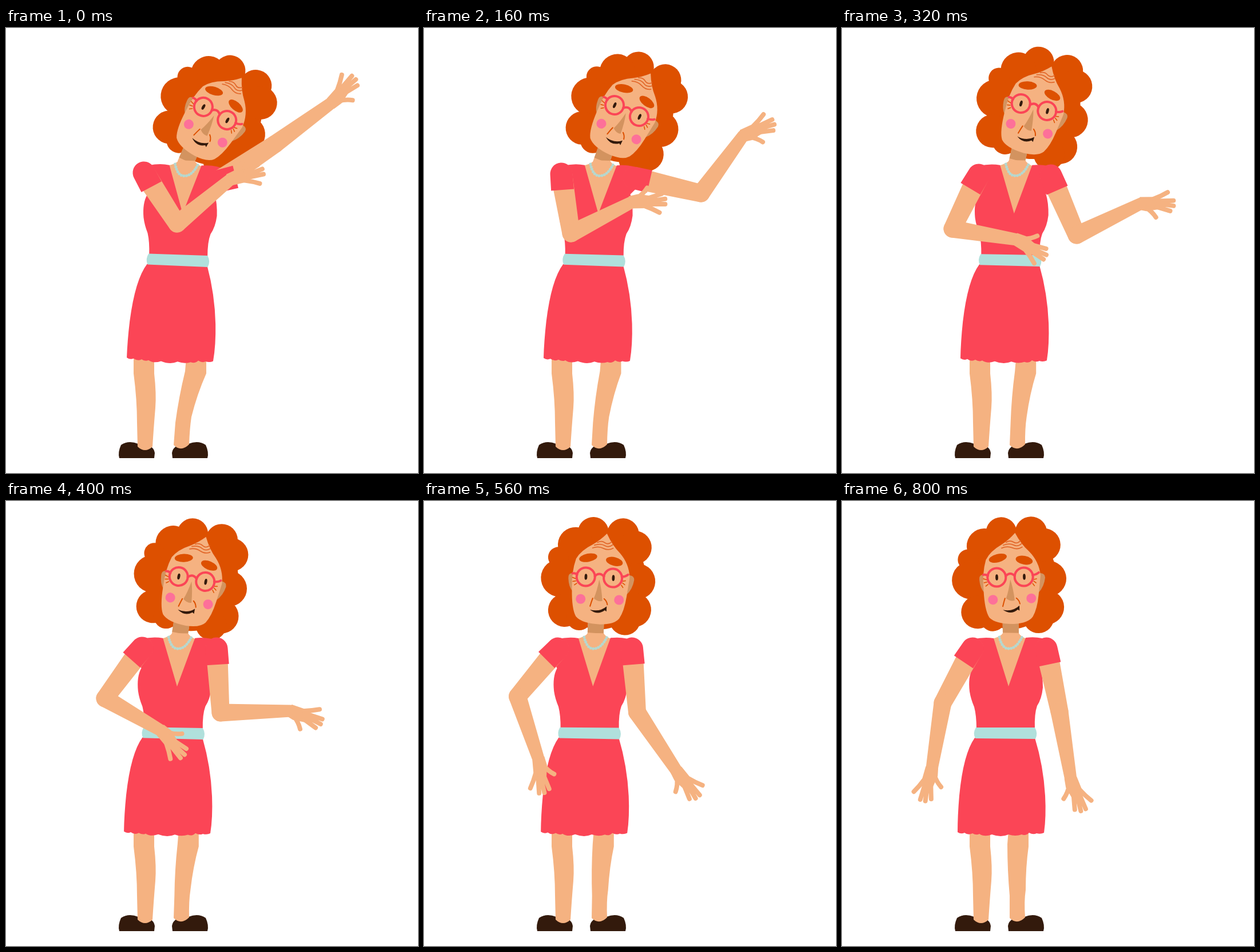
An HTML page with a canvas that plays this animation: 720 by 778 pixels, repeating every 0.84 s.

```html
<!DOCTYPE html>
<html lang="en">
<head>
<meta charset="utf-8">
<style>
html, body { margin: 0; width: 100%; height: 100%; overflow: hidden; background: #fff; }
canvas { display: block; width: 720px; height: 778px; }
</style>
</head>
<body>
<canvas id="stage" width="720" height="778"></canvas>
<script>
const ctx = document.getElementById('stage').getContext('2d');
const LOOP = 840, STEP = 40, RAD = Math.PI / 180;
const SKIN = '#f5b281', SHADE = '#d3935f', HAIR = '#dd5000', DRESS = '#fb4556';
const BELT = '#b0e0dc', DARK = '#331a0c', PINK = '#fd7099';

const TIMES = [0, 160, 320, 400, 480, 640, 800];

// One column per key time.
const LEAN = [1, .77, .55, .45, .36, .13, 0];
const HEAD = {
  x: [365.5, 354.5, 335.5, 325, 315.5, 299, 294],
  y: [149.5, 145, 138.5, 136.5, 134.5, 133, 133],
  turn: [29.3, 25, 16, 11, 6, 0, -1.2]
};

// Shoulder, elbow, wrist for each key, then the bend of the hand in degrees.
const LEFT_ARM = armTracks([
  [241, 253, 299, 342, 393, 264, 14],
  [240, 255, 257, 359, 364, 304, 14],
  [239, 257, 193, 351, 306, 370, 10],
  [238, 257, 173, 345, 272, 402, 8],
  [237, 258, 164, 338, 232, 431, 2],
  [231, 258, 166, 347, 175, 466, 0],
  [228, 258, 176, 353, 157, 468, -6]
]);
const RIGHT_ARM = armTracks([
  [374, 267, 470, 203, 570, 130, 0],
  [367, 262, 484, 289, 558, 188, 42],
  [365, 258, 410, 362, 522, 307, 38],
  [368, 258, 375, 370, 497, 367, 33],
  [367, 258, 358, 367, 472, 424, 25],
  [360, 258, 388, 368, 411, 487, -7],
  [357, 258, 380, 368, 400, 487, 0]
]);

function armTracks(poses) {
  const rows = poses.map(([sx, sy, ex, ey, wx, wy, bend]) => [
    sx, sy,
    Math.atan2(ey - sy, ex - sx), Math.hypot(ey - sy, ex - sx),
    Math.atan2(wy - ey, wx - ex), Math.hypot(wy - ey, wx - ex),
    bend * RAD
  ]);
  return rows[0].map((_, i) => rows.map(row => row[i]));
}

// Smooth curve through the key values.
function sample(values, t) {
  const last = TIMES.length - 1;
  if (t >= TIMES[last]) return values[last];
  let i = 0;
  while (t >= TIMES[i + 1]) i++;
  const slope = k => {
    const a = Math.max(0, k - 1), b = Math.min(last, k + 1);
    return (values[b] - values[a]) / (TIMES[b] - TIMES[a]);
  };
  const span = TIMES[i + 1] - TIMES[i], u = (t - TIMES[i]) / span, v = 1 - u;
  return v * v * (1 + 2 * u) * values[i] + u * u * (3 - 2 * u) * values[i + 1]
    + span * u * v * (v * slope(i) - u * slope(i + 1));
}

function fill(path, color) {
  ctx.fillStyle = color;
  ctx.fill(typeof path === 'string' ? new Path2D(path) : path);
}

function stroke(path, color, width) {
  ctx.strokeStyle = color;
  ctx.lineWidth = width;
  ctx.stroke(new Path2D(path));
}

function ellipse(x, y, rx, ry, color, turn = 0) {
  const path = new Path2D();
  path.ellipse(x, y, rx, ry, turn * RAD, 0, 2 * Math.PI);
  fill(path, color);
}

function placed(x, y, turn, draw) {
  ctx.save();
  ctx.translate(x, y);
  ctx.rotate(turn);
  draw();
  ctx.restore();
}

// Limb along +x, narrowing from r1 to r2 with round ends.
function limb(length, r1, r2) {
  const tilt = Math.acos((r1 - r2) / length);
  const path = new Path2D();
  path.arc(0, 0, r1, tilt, -tilt);
  path.arc(length, 0, r2, -tilt, tilt);
  fill(path, SKIN);
}

function hand(side) {
  ctx.scale(1, side);
  const palm = 'M-3-10L12-10L31-3L33 12L24 16L-3 10Z';
  fill(palm, SKIN);
  stroke(palm, SKIN, 2);
  stroke('M10-5Q22-9 31-18M29 0L53-2M30 6L57 8M30 11L55 17M21 13Q32 20 42 29', SKIN, 8);
}

function arm(tracks, t, side) {
  const [x, y, upper, upperLength, lower, lowerLength, bend] = tracks.map(v => sample(v, t));
  placed(x, y, upper, () => {
    limb(upperLength, 19, 15.5);
    ctx.translate(upperLength, 0);
    ctx.rotate(lower - upper);
    limb(lowerLength, 15.5, 10.5);
    ctx.translate(lowerLength, 0);
    ctx.rotate(bend);
    hand(side);
  });
  const cuff = side > 0 ? upper + 5 * RAD : Math.max(upper, -14 * RAD);
  placed(x, y, cuff, () => fill('M0-19.5L28-20L28 20L0 19.5A19.5 19.5 0 0 1 0-19.5Z', DRESS));
}

function legs(lean) {
  const shoe = 'M198 752Q195 742 201 729Q214 720 231 727L252 731Q259 735 260 743L259 752Z';
  fill(shoe, DARK);
  ctx.save();
  ctx.translate(550, 0);
  ctx.scale(-1, 1);
  fill(shoe, DARK);
  ctx.restore();

  fill('M223 575L223 604Q229 650 229 690L230 732Q243 744 256 732Q258 700 261 664Q263 640 259 604L259 575Z', SKIN);
  const k = 24 * lean, m = 13 * lean, n = 3 * lean;
  fill(`M${291 + k} 575L${289 + k} 600Q${289 + m} 645 ${293 + n} 690L293 729Q306 742 320 728
    Q${318 + n} 700 ${321 + n} 680Q${321 + m} 640 ${326 + k} 604L${326 + k} 575Z`, SKIN);
}

function neck(lean, turn) {
  placed(295 + 20 * lean, 231 + 2 * lean, turn * .8, () => {
    fill('M-14-26L14-26L14 6L-14 6Z', SKIN);
    fill('M-14-26L14-26L14 0L-14-1Z', SHADE);
  });
}

function body(lean) {
  placed(280 + 9 * lean, 580, .034 * lean, () => {
    ctx.translate(-280, -580);
    fill('M262 241Q278 237 281 231L309 231Q312 237 323 241L292 328Z', SKIN);
    fill(`M265 240Q248 237 228 242L212 262L228 293Q220 308 223 333Q225 346 231 360Q235 375 235 398
      L337 398Q336 372 341 358Q349 346 351 326Q351 304 346 289L372 262L364 245Q346 236 321 239L291 324Z`, DRESS);
    fill(`M232 414Q212 442 205 515Q202 550 202 579Q208 583 214 580Q221 585 228 581Q235 585 240 582
      Q249 588 262 583Q278 589 291 583Q303 587 314 583Q321 586 327 580Q334 584 340 581Q347 583 353 580
      Q357 552 355 515Q352 463 337 414Z`, DRESS);
    fill('M234 396L337 396Q343 406 338 416L233 415Q228 406 234 396Z', BELT);
    ctx.setLineDash([0, 4.6]);
    stroke('M275 238Q280 259 292 258Q305 258 315 237', '#b5d8cf', 5);
    ctx.setLineDash([]);
  });
}

function hair() {
  ellipse(1, 2, 80, 89, HAIR);
  [
    [-14, -78, 27], [38, -77, 28], [60, -55, 29], [67, 4, 31], [63, 54, 30], [48, 72, 27],
    [-44, -55, 31], [-73, -32, 18], [-69, 4, 33], [-58, 60, 29], [-32, 72, 22]
  ].forEach(([x, y, r]) => ellipse(x, y, r, r, HAIR));
}

function face() {
  fill('M-46-5Q-55-6-54 4Q-53 18-46 26ZM51-6Q61-6 61 2Q59 18 49 28Z', SHADE);
  fill(`M10-77Q-1-65-14-57Q-34-46-42-31Q-49-8-47 22Q-46 57-38 70Q-27 82 5 82
    Q30 81 38 70Q46 57 49 32L53-2Q51-26 34-44Q20-57 10-77Z`, SKIN);
  stroke('M-6-61Q1-65 7-61T19-63M-11-56Q0-60 7-56T21-58M-14-51Q-4-55 5-51T22-52', '#e2692c', 1.8);
  ellipse(-21, -33.5, 16, 7.2, HAIR, -13);
  ellipse(25, -29, 15, 7.5, HAIR, 12);
  fill('M0 4Q-3 24-8 37Q-1 43 7 41Q5 20 0 4Z', SHADE);
  ellipse(-31, 39, 8.5, 8.5, PINK);
  ellipse(36, 38, 8.5, 8.5, PINK);
  stroke('M-10 37Q-12 43-14 51M10 37Q15 41 16 47', HAIR, 2);
  stroke('M-41 4L-47 2M-41 8L-46 9M-39 12L-43 15M41 5L46 4M41 8L45 11M39 12L42 16', HAIR, 1.5);
  ellipse(-23.5, 0, 2.4, 5.3, DARK);
  ellipse(24.5, 0, 2.4, 5.3, DARK);
  ctx.strokeStyle = DRESS;
  ctx.lineWidth = 4;
  [-23.7, 23.7].forEach(x => {
    ctx.beginPath();
    ctx.arc(x, 0, 16, 0, 2 * Math.PI);
    ctx.stroke();
  });
  stroke('M-8-2Q0-10 8-2M-39-3Q-42-6-47-5M39-3Q45-3 50-7', DRESS, 4);
  fill('M-14 57Q3 61 15 50L15 59L12 57Q0 67-14 57Z', DARK);
}

function drawScene(t) {
  ctx.fillStyle = '#fff';
  ctx.fillRect(0, 0, 720, 778);
  ctx.lineCap = ctx.lineJoin = 'round';
  const lean = sample(LEAN, t);
  const x = sample(HEAD.x, t), y = sample(HEAD.y, t), turn = sample(HEAD.turn, t) * RAD;
  placed(x, y, turn, hair);
  legs(lean);
  neck(lean, turn);
  body(lean);
  placed(x, y, turn, face);
  arm(RIGHT_ARM, t, -1);
  arm(LEFT_ARM, t, 1);
}

const start = performance.now();
function tick() {
  const elapsed = (performance.now() - start) % LOOP;
  drawScene(Math.floor(elapsed / STEP) * STEP);
  requestAnimationFrame(tick);
}
tick();
</script>
</body>
</html>
```
